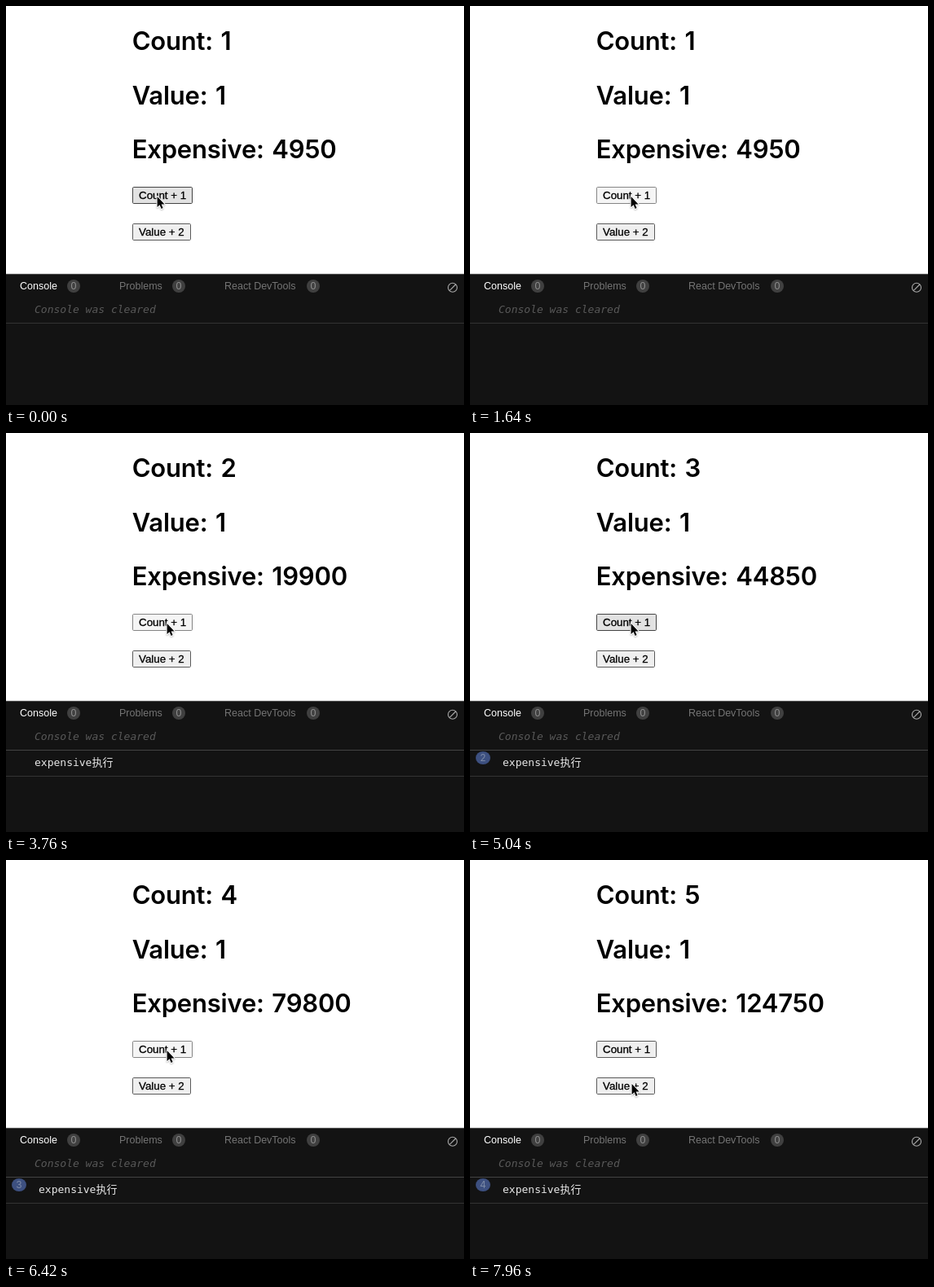
Animation, 562 px wide and 490 px high, one loop 8 s. Source, as an HTML page with a canvas:

```html
<!DOCTYPE html>
<html lang="en">
<head>
<meta charset="utf-8">
<title>Counter demo</title>
<style>
  html, body { margin: 0; width: 100%; height: 100%; overflow: hidden; background: #fff; }
  canvas { display: block; width: 562px; height: 490px; }
</style>
</head>
<body>
<canvas id="stage"></canvas>
<script>
const LOOP = 8000, W = 562, H = 490;
const SANS = 'Inter, sans-serif';
const ARIAL = '"Liberation Sans", Arial, sans-serif';
const MONO = '"DejaVu Sans Mono", "Noto Sans CJK SC", "Noto Sans CJK", monospace';

// Press and release times of each click on the first button.
const clicks = [[1640, 2040], [3760, 4180], [5140, 5540], [6420, 6800]];

// Pointer stops: time, x, y of the arrow tip.
const path = [
  [100, 185.6, 234], [540, 197.6, 224], [660, 197.6, 224], [720, 197.6, 221.8],
  [840, 197.6, 233], [940, 197.6, 234], [7660, 197.6, 234], [7960, 198.6, 275]
];

const canvas = document.getElementById('stage');
const ctx = canvas.getContext('2d');
const scale = window.devicePixelRatio || 1;
canvas.width = W * scale;
canvas.height = H * scale;

const clamp = v => Math.min(1, Math.max(0, v));
const ease = v => v * v * (3 - 2 * v);

function pointerAt(t) {
  let pos = path[0];
  for (let i = 1; i < path.length; i++) {
    const a = path[i - 1], b = path[i];
    if (t < a[0]) break;
    const k = ease(clamp((t - a[0]) / (b[0] - a[0])));
    pos = [t, a[1] + (b[1] - a[1]) * k, a[2] + (b[2] - a[2]) * k];
  }
  return { x: pos[1], y: pos[2] };
}

function text(str, x, y, font, color, align = 'left') {
  ctx.font = font;
  ctx.fillStyle = color;
  ctx.textAlign = align;
  ctx.fillText(str, x, y);
}

function rect(x, y, w, h, color) {
  ctx.fillStyle = color;
  ctx.fillRect(x, y, w, h);
}

function ellipse(x, y, rx, ry, color) {
  ctx.beginPath();
  ctx.ellipse(x, y, rx, ry, 0, 0, Math.PI * 2);
  ctx.fillStyle = color;
  ctx.fill();
}

function heading(str, y) {
  ctx.letterSpacing = '-0.2px';
  ctx.wordSpacing = '2px';
  text(str, 154.7, y, '600 31px ' + SANS, '#000');
  ctx.letterSpacing = ctx.wordSpacing = '0px';
}

const looks = {
  normal: ['#efefef', '#5a5a5a'],
  hover: ['#e2e2e2', '#444'],
  active: ['#f5f5f5', '#858585']
};

function button(label, y, w, look) {
  const [fill, border] = looks[look];
  ctx.beginPath();
  ctx.roundRect(155.5, y + 0.5, w - 1, 20, 1.2);
  ctx.fillStyle = fill;
  ctx.fill();
  ctx.strokeStyle = border;
  ctx.lineWidth = 1;
  ctx.stroke();
  text(label, 163, y + 15, '13.333px ' + ARIAL, '#000');
  // A hairline gives the heavier, smoothed look of the label.
  ctx.strokeStyle = '#000';
  ctx.lineWidth = 0.3;
  ctx.strokeText(label, 163, y + 15);
}

function tab(label, x, badgeX, color) {
  text(label, x, 348, '12.5px ' + ARIAL, color);
  ellipse(badgeX, 344, 8, 8, '#404040');
  text('0', badgeX, 348, '12.5px ' + ARIAL, '#8c8c8c', 'center');
}

function clearIcon() {
  ctx.beginPath();
  ctx.arc(548, 345.8, 5.5, 0, Math.PI * 2);
  ctx.moveTo(544.2, 349.6);
  ctx.lineTo(551.8, 342);
  ctx.strokeStyle = '#aaa';
  ctx.lineWidth = 1.1;
  ctx.stroke();
}

function logRow(done, opacity) {
  ctx.globalAlpha = opacity;
  const repeated = done > 1;
  if (repeated) {
    ellipse(16, 399, 9, 8, '#3d5080');
    text(done, 16, 403, '12px ' + SANS, '#7c8aa6', 'center');
  }
  text('expensive执行', repeated ? 40 : 35, 409, '13px ' + MONO, '#e8e8e8');
  rect(0, 389, W, 1, '#444');
  rect(0, 421, W, 1, '#333');
  ctx.globalAlpha = 1;
}

function arrow({ x, y }) {
  ctx.save();
  ctx.translate(x, y);
  ctx.beginPath();
  [[0, 0], [0, 13], [3, 10.2], [5, 15], [7, 14.1], [5, 9.4], [9, 9.4]]
    .forEach(([px, py]) => ctx.lineTo(px, py));
  ctx.closePath();
  ctx.shadowColor = 'rgba(0,0,0,.25)';
  ctx.shadowBlur = 2 * scale;
  ctx.shadowOffsetY = scale;
  ctx.strokeStyle = '#fff';
  ctx.lineWidth = 2;
  ctx.lineJoin = 'round';
  ctx.stroke();
  ctx.shadowColor = 'transparent';
  ctx.fillStyle = '#000';
  ctx.fill();
  ctx.restore();
}

function draw(t) {
  const pointer = pointerAt(t);
  const done = clicks.filter(c => t >= c[1]).length;
  const count = done + 1;
  const limit = count * 100;
  const pressed = clicks.some(([down, up]) => t >= down && t < up);
  const over = pointer.y >= 222.5 && pointer.y < 243;

  ctx.setTransform(scale, 0, 0, scale, 0, 0);
  rect(0, 0, W, H, '#fff');
  heading('Count: ' + count, 54);
  heading('Value: 1', 121);
  heading('Expensive: ' + limit * (limit - 1) / 2, 187);
  button('Count + 1', 222, 74, pressed ? 'active' : over ? 'hover' : 'normal');
  button('Value + 2', 267, 72, 'normal');

  rect(0, 328, W, 1, '#e8e8e8');
  rect(0, 329, W, H - 329, '#131313');
  rect(0, 329, W, 1, '#444');
  tab('Console', 17, 83, '#fff');
  tab('Problems', 139, 212, '#757575');
  tab('React DevTools', 268, 377, '#757575');
  clearIcon();
  text('Console was cleared', 35, 377, 'italic 13px ' + MONO, '#595959');
  rect(0, 389, W, 1, '#333');
  if (done) logRow(done, clamp((t - clicks[0][1]) / 160));
  arrow(pointer);
}

const start = performance.now();
function tick() {
  draw((performance.now() - start) % LOOP);
  requestAnimationFrame(tick);
}
tick();
</script>
</body>
</html>
```
